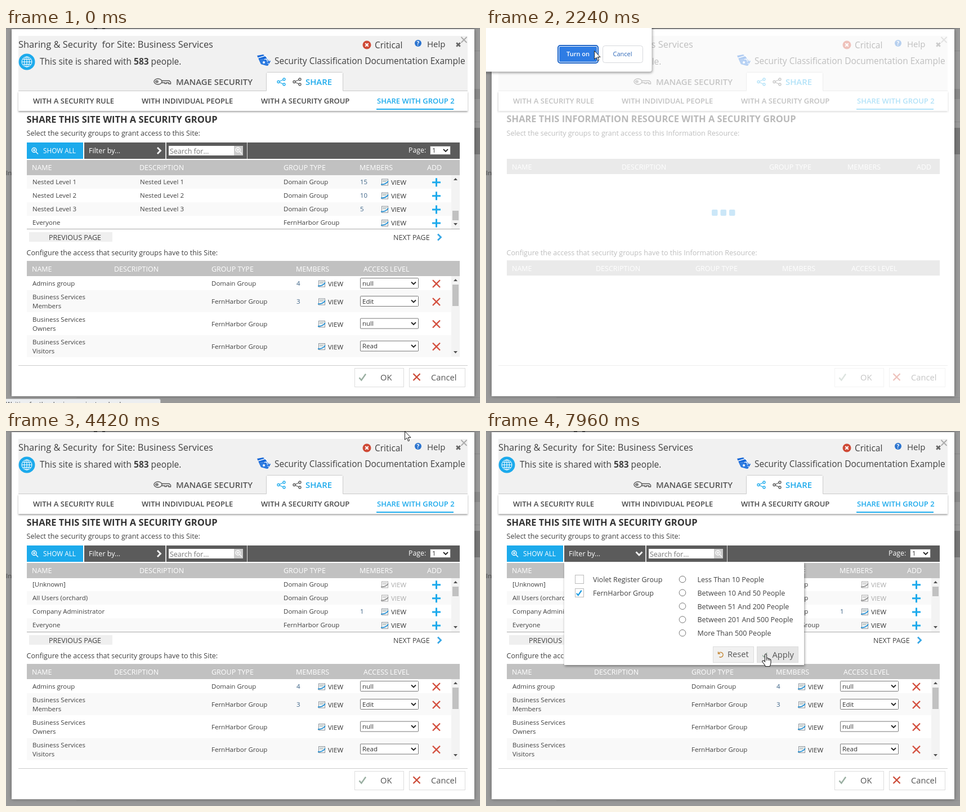
An HTML page for the animation above (8 s loop, 842 px wide and 665 px high).

```html
<!DOCTYPE html>
<html lang="en">
<head>
<meta charset="utf-8">
<title>Sharing dialog</title>
<style>
html, body { margin: 0; width: 100%; height: 100%; overflow: hidden; background: #999; }
svg { display: block; width: 842px; height: 665px; }
text { font-family: "Open Sans", "Noto Sans", sans-serif; white-space: pre; }
.lift { filter: drop-shadow(1px 2px 2px rgba(0,0,0,.4)); }
</style>
</head>
<body>
<svg id="stage" viewBox="0 0 842 665"></svg>
<script>
const BLUE = '#1caaec', INK = '#404040', RED = '#d4503f';

// Drawing helpers; text is placed by the middle of its capitals
const text = (x, y, s, size = 12.5, fill = INK, weight = 400) =>
  `<text x="${x}" y="${(y + size * .36).toFixed(2)}" font-size="${size}" fill="${fill}" font-weight="${weight}">${s}</text>`;
const rect = (x, y, w, h, fill, more = '') =>
  `<rect x="${x}" y="${y}" width="${w}" height="${h}" fill="${fill}" ${more}/>`;
const frame = (x, y, w, h, fill, line, more = '') =>
  rect(x + .5, y + .5, w - 1, h - 1, fill, `stroke="${line}" ${more}`);
const line = (d, color, width = 1, more = '') =>
  `<path d="${d}" fill="none" stroke="${color}" stroke-width="${width}" ${more}/>`;
const disc = (x, y, r, fill, more = '') => `<circle cx="${x}" cy="${y}" r="${r}" fill="${fill}" ${more}/>`;
const at = (x, y, s) => `<g transform="translate(${x} ${y})">${s}</g>`;
const group = (id, s, more = '') => `<g id="${id}" ${more}>${s}</g>`;

const cross = (x, y, r, color, width) => line(`M${x - r} ${y - r}l${2 * r} ${2 * r}m0 ${-2 * r}l${-2 * r} ${2 * r}`, color, width);
const plus = (x, y) => line(`M${x - 7.5} ${y}h15m-7.5 -7.5v15`, BLUE, 3);
const tick = (x, y, color, k = 1, w = 2) => line(`M${x - 5 * k} ${y + k}l${3.5 * k} ${4 * k}l${7 * k} ${-10 * k}`, color, w);
const lens = (x, y, color) =>
  disc(x, y, 4, 'none', `stroke="${color}" stroke-width="1.4"`) +
  line(`M${x + 3} ${y + 3}l4 4M${x - 2} ${y}h4m-2 -2v4`, color, 1.3);
const share = (x, y, c) => line(`M${x + 5} ${y - 4.5}L${x - 5} ${y}L${x + 5} ${y + 4.5}`, c, 1.2) +
  [[5, -4.5], [-5, 0], [5, 4.5]].map(p => disc(x + p[0], y + p[1], 2, '#fff', `stroke="${c}" stroke-width="1.3"`)).join('');
const view = (x, y, off) => at(x, y,
  frame(1, -6, 12, 12, '#fbfbfb', off ? '#aaa' : '#8a9299') +
  line('M3 -3h8M3 -1h6', off ? '#bbb' : '#9aa', 1) +
  line('M0 4Q9 4 13 -2', off ? '#999' : '#2a93d5', 2) +
  text(18, .5, 'VIEW', 11.5, off ? '#aaa' : '#333'));
const select = (x, y, s, w, h) => frame(x, y, w, h, '#fff', '#777', 'rx="1"') +
  text(x + 4, y + h / 2, s, 11.5, '#333') +
  line(`M${x + w - 13} ${y + h / 2 - 2}l4 4l4 -4`, '#222', 1.8);
const scrollbar = (top, bottom, thumb, size) =>
  rect(791, top, 15, bottom - top, '#f3f3f3') +
  rect(793, thumb, 11, size, '#c1c1c1') +
  `<path d="M795 ${top + 9}h7l-3.5 -4zM795 ${bottom - 10}h7l-3.5 4z" fill="#505050"/>`;

function heads(y, xs, names) {
  return names.map((n, i) => text(xs[i], y, n, 12.5, '#fff')).join('');
}
const TOP = ['NAME', 'DESCRIPTION', 'GROUP TYPE', 'MEMBERS', 'ADD'];
const LOW = ['NAME', 'DESCRIPTION', 'GROUP TYPE', 'MEMBERS', 'ACCESS LEVEL'];
const bothHeads = (y1, y2, a, b) => heads(y1, a, TOP) + heads(y2, b, LOW);

const HOST = 'FernHarbor Group', DOMAIN = 'Domain Group';
function topRows(y0, rows, odd, thumb) {
  return rect(37, 261, 769, 95, '#fff') + rows.map(([name, desc, type, count, off], i) => {
    const y = y0 + i * 24.1;
    return (i % 2 === odd ? rect(37, y - 12, 754, 24, '#f9f9f9') : '') +
      text(47, y, name, 11.5) + text(238, y, desc, 11.5) + text(493, y, type, 11.5) +
      text(629, y, count, 11.5, '#3d6487') + view(666, y + .5, off) + plus(764.5, y + .7);
  }).join('') + scrollbar(261, 356, thumb, 17);
}

function lowRows() {
  const rows = [
    [453, ['Admins group'], DOMAIN, '4', 'null'],
    [485, ['Business Services', 'Members'], HOST, '3', 'Edit'],
    [524.5, ['Business Services', 'Owners'], HOST, '', 'null'],
    [564.5, ['Business Services', 'Visitors'], HOST, '', 'Read']];
  return rows.map(([y, names, type, count, level], i) =>
    (i % 2 ? rect(37, y - 20, 754, 39, '#f9f9f9') : '') +
    names.map((n, k) => text(47, y + (k * 2 - names.length + 1) * 8, n, 11.5)).join('') +
    text(365, y, type, 11.5) + text(516, y, count, 11.5, '#3d6487') +
    view(554, y + .5) + select(629, y - 10, level, 104, 19) +
    cross(764.5, y + .5, 6.5, RED, 2.3)).join('') + scrollbar(440, 583, 455, 38);
}

const button = (x, y, w, h, fill, label, tx) =>
  frame(x, y, w, h, fill, '#ddd') + text(tx, y + h / 2 - .5, label, 14.7, '#555');

const bubble = fill => frame(-6, 657, 281, 20, fill, '#b5b5b5', 'rx="3"') +
  text(0, 667.5, 'Waiting for the sharing service to reload...', 11, '#333');

function backdrop() {
  return rect(0, 0, 842, 665, '#999') + rect(0, 0, 842, 2, '#8d8d8d') +
    rect(156, 0, 6, 2, '#444') + rect(171, 0, 5, 2, '#444') +
    rect(832, 40, 10, 1, '#888') + rect(832, 108, 10, 18, '#8a8a8a') +
    rect(832, 166, 10, 1, '#888') + rect(832, 177, 10, 47, '#777') +
    text(0, 257, 'In', 11.5, '#444') + rect(125, 655, 717, 1, '#8f8f8f') +
    group('bubble', bubble('#eceef0'));
}

function shell() {
  const tags = '<path d="M2 2L13 0L26 12L21 20L9 17Z" fill="#1668d8"/>' +
    line('M4 6L17 2L24 12M5 10L19 8L22 17', '#fff', 1.4) +
    '<path d="M5 9L14 8L22 14L19 20L9 17Z" fill="#2d7be0"/>' + disc(14, 14, 2, '#fff');
  return rect(10, 2, 822, 651, '#fff', 'style="filter:drop-shadow(0 0 3px rgba(0,0,0,.35))"') +
    rect(22, 14, 798, 98, '#f1f1f1') +
    text(22, 29, 'Sharing &amp; Security  for Site: Business Services', 16.45) +
    disc(37, 60, 14.5, BLUE) +
    line('M28 60h18M37 51v18M30 55.500h14M30 64.500h14', '#fff', 1) +
    `<g fill="none" stroke="#fff"><circle cx="37" cy="60" r="9"/><ellipse cx="37" cy="60" rx="4.500" ry="9"/></g>` +
    text(60, 59, 'This site is shared with <tspan font-weight="700">583</tspan> people.', 15.5) +
    disc(641, 30, 7.5, '#cf4a36') + cross(641, 30, 2.7, '#fff', 2) +
    text(655, 30, 'Critical', 15.5) +
    disc(732, 27, 6, '#2b74cf') + text(729.6, 27, '?', 10, '#fff', 700) +
    text(748, 28.5, 'Help', 15) +
    cross(803.5, 29.5, 3.3, '#666', 2.8) + cross(813.5, 21, 5, '#aaa', 1.8) +
    at(444, 47, tags) +
    text(477, 58, 'Security Classification Documentation Example', 15.5) +
    line('M22 111.500H462.500V81Q462.500 78.500 465 78.500H596Q598.500 78.500 598.500 81V111.500H820', '#ccc', 1) +
    rect(463, 79, 135, 34, '#fff') +
    `<g fill="none" stroke="#555" stroke-width="1.4"><ellipse cx="270" cy="95" rx="7" ry="5"/><ellipse cx="268" cy="95" rx="2" ry="1.500"/><path d="M277 93.500H290L292.500 96V99H289V97H285V98.500H282V97H277"/></g>` +
    text(302, 95.5, 'MANAGE SECURITY', 14.9, '#555', 600) +
    share(489, 95.5, BLUE) + share(517, 95.5, '#555') +
    text(532, 95.5, 'SHARE', 14.9, BLUE, 600) +
    rect(22, 112, 798, 35, '#fff', 'style="filter:drop-shadow(0 2px 1.500px rgba(0,0,0,.35))"') +
    rect(463, 110, 135, 4, '#fff') +
    [[48, 'WITH A SECURITY RULE'], [241, 'WITH INDIVIDUAL PEOPLE'], [453, 'WITH A SECURITY GROUP'], [659, 'SHARE WITH GROUP 2']]
      .map(([x, s], i) => text(x, 129, s, 13, i === 3 ? BLUE : '#484848', 600)).join('') +
    rect(658, 143, 137, 2, BLUE) +
    rect(22, 598, 798, 1, '#ccc') +
    button(619, 603, 88, 34, '#fff', 'OK', 665) + tick(633, 619, '#9bb0a3', 1.1, 2.5) +
    button(716, 603, 100, 34, '#fff', 'Cancel', 755) + cross(729.5, 619, 6, '#cc4b38', 2.3);
}

function site() {
  const first = [['Nested Level 1', 'Nested Level 1', DOMAIN, '15'], ['Nested Level 2', 'Nested Level 2', DOMAIN, '10'],
    ['Nested Level 3', 'Nested Level 3', DOMAIN, '5'], ['Everyone', '', HOST, '']];
  const second = [['[Unknown]', '', DOMAIN, '', 1], ['All Users (orchard)', '', DOMAIN, '', 1],
    ['Company Administrator', '', DOMAIN, '1'], ['Everyone', '', HOST, '']];
  return text(36.5, 162.5, 'SHARE THIS SITE WITH A SECURITY GROUP', 16.45, '#333', 700) +
    text(36.5, 186.5, 'Select the security groups to grant access to this Site:', 12.55) +
    rect(37, 203, 769, 29, '#5b5b5b') + rect(37, 203, 100, 29, BLUE) +
    rect(137, 203, 2, 29, '#fff') + rect(283, 203, 2, 29, '#ddd') + rect(428, 203, 1, 29, '#ddd') +
    lens(50, 216.5, '#fff') + text(66, 217.5, 'SHOW ALL', 11.8, '#fff') +
    text(147, 217.5, 'Filter by...', 12.6, '#fff') +
    group('chevron', line('M-3 -5.500L2.500 0L-3 5.500', '#fff', 2.8)) +
    rect(289, 209, 132, 17, '#fff') + rect(405, 209, 16, 17, '#ccc') + lens(412, 216, '#fff') +
    text(291, 218, 'Search for...', 12.5, '#777') +
    text(715, 217, 'Page:', 12.3, '#fff') + select(753, 209, '1', 37, 16) +
    rect(37, 234, 769, 27, '#c1c1c1') + rect(37, 413, 769, 27, '#c1c1c1') +
    group('early', bothHeads(247.5, 427.5, [46, 239, 497, 633, 755], [46, 193, 368, 519, 641])) +
    group('final', bothHeads(247.5, 427.5, [46, 237, 493, 628, 748], [46, 192, 365, 515, 635])) +
    group('first', topRows(273, first, 0, 324)) + group('second', topRows(272, second, 1, 276)) +
    rect(37, 356, 769, 1, '#aaa') +
    rect(41, 362, 148, 17, '#efefef') + text(76, 371, 'PREVIOUS PAGE', 12.55) +
    text(688, 371, 'NEXT PAGE', 12.55) + line('M767 365.500l5.500 5.500l-5.500 5.500', '#36a7e6', 2.8) +
    text(36.5, 398.5, 'Configure the access that security groups have to this Site:', 12.55) + lowRows();
}

function loading() {
  return rect(23, 151, 797, 446, '#fff') +
    text(36.5, 161.5, 'SHARE THIS INFORMATION RESOURCE WITH A SECURITY GROUP', 16.45, '#333', 700) +
    text(36.5, 186.5, 'Select the security groups to grant access to this Information Resource:', 12.55) +
    text(36.5, 398.5, 'Configure the access that security groups have to this Information Resource:', 12.55) +
    rect(37, 232, 769, 27, '#c1c1c1') + rect(37, 412, 769, 27, '#c1c1c1') +
    bothHeads(246.5, 426.5, [46, 241, 503, 642, 765], [46, 195, 372, 526, 649]) +
    rect(22, 14, 799, 623, '#fff', 'id="veil"') +
    [401, 416.5, 432].map(x => rect(x, 322, 10.5, 11, '#cbe7f8', 'rx="2"')).join('');
}

function menu() {
  const sizes = ['Less Than 10 People', 'Between 10 And 50 People', 'Between 51 And 200 People',
    'Between 201 And 500 People', 'More Than 500 People'];
  return rect(139, 233, 426, 182, '#fff', 'class="lift"') +
    ['Violet Register Group', HOST].map((s, i) =>
      frame(158, 255 + i * 24, 16, 16, '#fff', '#bbb') + text(190, 263.5 + i * 23.5, s, 12.5)).join('') +
    group('check', tick(165, 287, '#1c9be0', .85, 2.2)) +
    sizes.map((s, i) => disc(349, 263 + i * 23.8, 5.8, '#fff', 'stroke="#777"') +
      text(375.5, 263.5 + i * 23.8, s, 12.5)).join('') +
    button(403, 382, 73, 29, '#f1f1f1', 'Reset', 429) +
    line('M413.500 394A4.300 4.300 0 1 1 414.500 400.500M412.500 391.500v3.500h3.500', '#c58a3c', 1.5) +
    button(481, 382, 74, 29, '#f1f1f1', '', 0) +
    group('hover', rect(482, 383, 72, 27, '#e6e6e6')) +
    tick(495, 397, '#9bb0a3', .75, 1.8) + text(508.5, 396.5, 'Apply', 14.7, '#555');
}

const dialog = () => rect(-8, -8, 302.5, 85.5, '#fff', 'rx="4" class="lift"') +
  rect(128, 31, 71, 31, '#fff', 'rx="4" stroke="#1a62c6" stroke-width="2"') +
  rect(130, 33, 67, 27, '#1a73e8', 'rx="2" id="turn"') + text(143, 46.5, 'Turn on', 11, '#fff', 600) +
  frame(207, 31, 72, 31, '#fff', '#d6d8dc', 'rx="4"') + text(225.5, 46.5, 'Cancel', 11, '#2b66b8');

const arrow = '<path d="M.5 .5V15.500L4 12.300L6.500 18L8.700 17L6.300 11.500H11Z" fill="#fff" stroke="#222"/>';
const hand = '<path d="M5.500 12V2Q5.500 .5 7 .5T8.500 2V8Q11 6.500 11.300 9Q13.500 8 13.800 10Q16 9.300 16 11.500V16Q16 19 14 22.500H6.500Q5 19 1 14.500Q.3 12.500 2.500 12Q4 12 5.500 14Z" fill="#fff" stroke="#222" stroke-width="1.1"/>' +
  line('M8.500 8V12M11.300 9.500V12M13.800 10.500V12.500', '#222', 1);

document.getElementById('stage').innerHTML =
  '<clipPath id="drop"><rect id="reveal" x="130" y="233" width="445" height="0"/></clipPath>' +
  backdrop() + shell() + group('site', site()) + group('load', loading()) +
  group('menu', menu(), 'clip-path="url(#drop)"') +
  group('blank', rect(0, 0, 842, 665, '#f1f1f1') + rect(275, 663, 307, 2, '#b9b9b9') + bubble('#dee1e8')) +
  group('dialog', dialog()) + group('arrow', arrow) + group('hand', hand);

const el = id => document.getElementById(id);
const show = (id, v) => el(id).setAttribute('opacity', +v);
const move = (id, x, y, more = '') => el(id).setAttribute('transform', `translate(${x} ${y})${more}`);
const ramp = (t, a, b) => Math.min(1, Math.max(0, (t - a) / (b - a)));
const ease = p => p * p * (3 - 2 * p);

// Pointer track: time, x, y; straight eased moves between stops
const arrowTrack = [[1310, 300, 150], [2110, 192, 40], [4419, 192, 40], [4420, 708, 0], [4479, 708, 0], [4480, 702, 4], [4580, 702, 4], [5270, 278, 218]];
const handTrack = [[5270, 273, 217.5], [6600, 273, 217.5], [7110, 166, 292], [7220, 166, 292], [7770, 486, 383], [7959, 486, 383], [7960, 490, 395]];
function follow(track, t) {
  let [, x, y] = track[0];
  for (let i = 1; i < track.length; i++) {
    const p = ease(ramp(t, track[i - 1][0], track[i][0]));
    x += (track[i][1] - x) * p;
    y += (track[i][2] - y) * p;
    if (p < 1) break;
  }
  return [x, y];
}

function draw(t) {
  const reloaded = t >= 970, leave = 1 - ramp(t, 2450, 2700);
  show('bubble', !reloaded);
  show('first', !reloaded);
  show('second', reloaded);
  show('early', reloaded && t < 3310);
  show('final', !reloaded || t >= 3310);
  show('load', reloaded ? 1 - ease(ramp(t, 2450, 3000)) : 0);
  show('veil', .56 + .2 * ramp(t, 2180, 2300));
  show('blank', reloaded ? 1 - ramp(t, 1310, 2110) : 0);
  show('dialog', t >= 260 ? leave : 0);
  el('turn').setAttribute('fill', t >= 2110 ? '#2e7ce4' : '#1a73e8');

  move('chevron', 272, 217.5, t >= 5550 ? ' rotate(90)' : '');
  el('reveal').setAttribute('height', 190 * ease(ramp(t, 5500, 6130)));
  show('menu', t >= 5550);
  show('check', t >= 7260);
  show('hover', t >= 7770);

  move('arrow', ...follow(arrowTrack, t));
  move('hand', ...follow(handTrack, t));
  show('arrow', t < 4420 ? ramp(t, 1310, 2110) * leave : t < 5270);
  show('hand', t >= 5270);
}

const start = performance.now();
function tickFrame() {
  draw((performance.now() - start) % 8000);
  requestAnimationFrame(tickFrame);
}
tickFrame();
</script>
</body>
</html>
```
